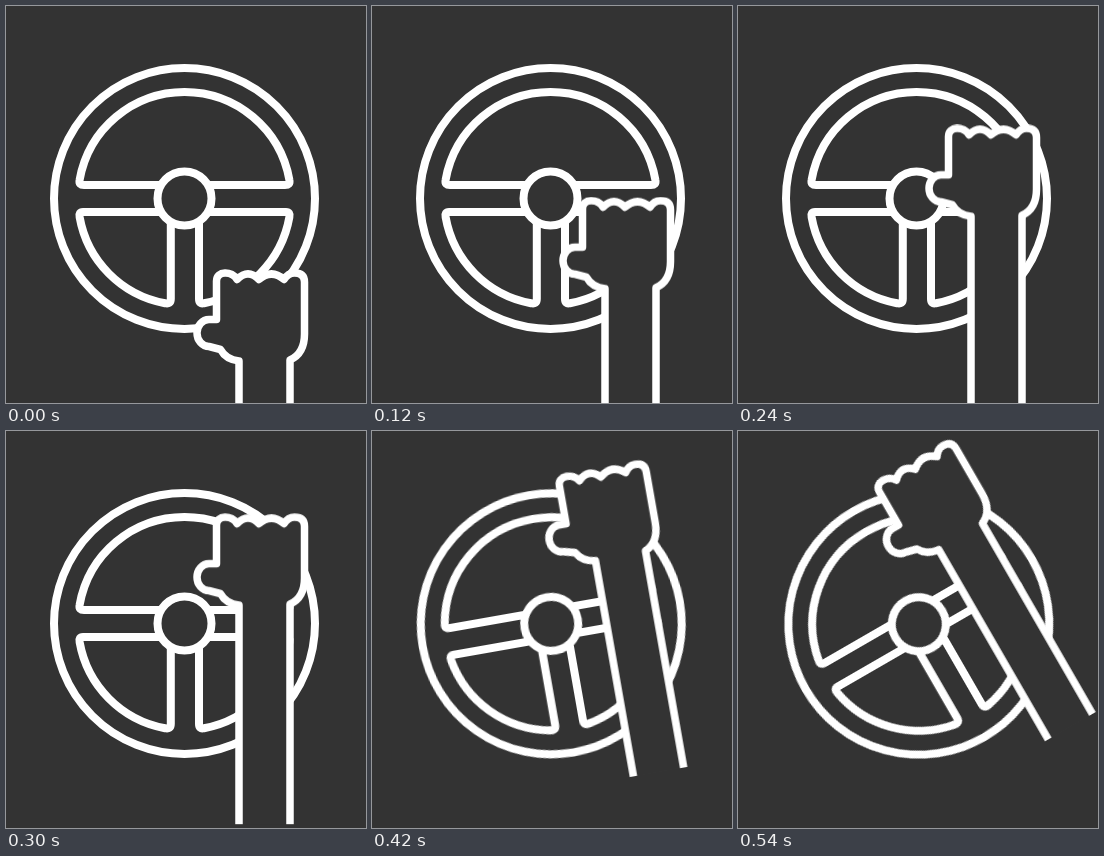
Recreate the animation shown at these times as an HTML page. Size 360 by 397 pixels, loop 600 ms.

```html
<!DOCTYPE html>
<html lang="en">
<head>
<meta charset="utf-8">
<title>Steering wheel</title>
<style>
  html, body { margin: 0; width: 100%; height: 100%; overflow: hidden; background: #333; }
  svg { display: block; width: 360px; height: 397px; }
  #scene { fill: #333; stroke: #fff; stroke-width: 8; stroke-linejoin: round; transform-origin: 181px 188.5px; }
  #hand { stroke-width: 7.5; }
</style>
</head>
<body>
<svg viewBox="0 0 360 397">
  <g id="scene">
    <g id="wheel">
      <circle cx="178.5" cy="192.5" r="130.5"/>
      <path d="M78 179H279Q284.5 179 283.4 174A106.5 106.5 0 0 0 73.6 174Q72.5 179 78 179Z"/>
      <path d="M77 206H164.8V293Q164.8 298.5 159 297.2A106.5 106.5 0 0 1 73.6 211Q72.5 206 77 206Z"/>
      <path d="M280 206H193V293Q193 298.5 198 297.2A106.5 106.5 0 0 0 283.4 211Q284.5 206 280 206Z"/>
      <circle cx="178.5" cy="192.5" r="27"/>
    </g>
    <path id="hand" d="M233 574V355C224 354 218 350 214.5 343.5L203 340.5A12 13.5 0 0 1 203 313.5H210.5
      V275C210.5 264.5 226 264.5 231 273.5Q242 262.5 253 273.5Q265.5 262.5 278 273.5Q282 267 288.5 267Q298.5 267 298.5 276
      V328C298.5 341 293 350 284 354V574"/>
  </g>
</svg>
<script>
  const loop = { duration: 600, iterations: Infinity };
  const play = (id, frames) => document.getElementById(id).animate(frames, loop);

  // The hand reaches up in six steps, then turns the wheel 10 degrees per step.
  play('hand', [
    { offset: 0, transform: 'translateY(0px)', easing: 'steps(6, end)' },
    { offset: 0.6, transform: 'translateY(-217px)' },
    { offset: 1, transform: 'translateY(-217px)' }
  ]);
  play('scene', [
    { offset: 0, transform: 'rotate(0deg)' },
    { offset: 0.6, transform: 'rotate(0deg)', easing: 'steps(4, end)' },
    { offset: 1, transform: 'rotate(-40deg)' }
  ]);
</script>
</body>
</html>
```
